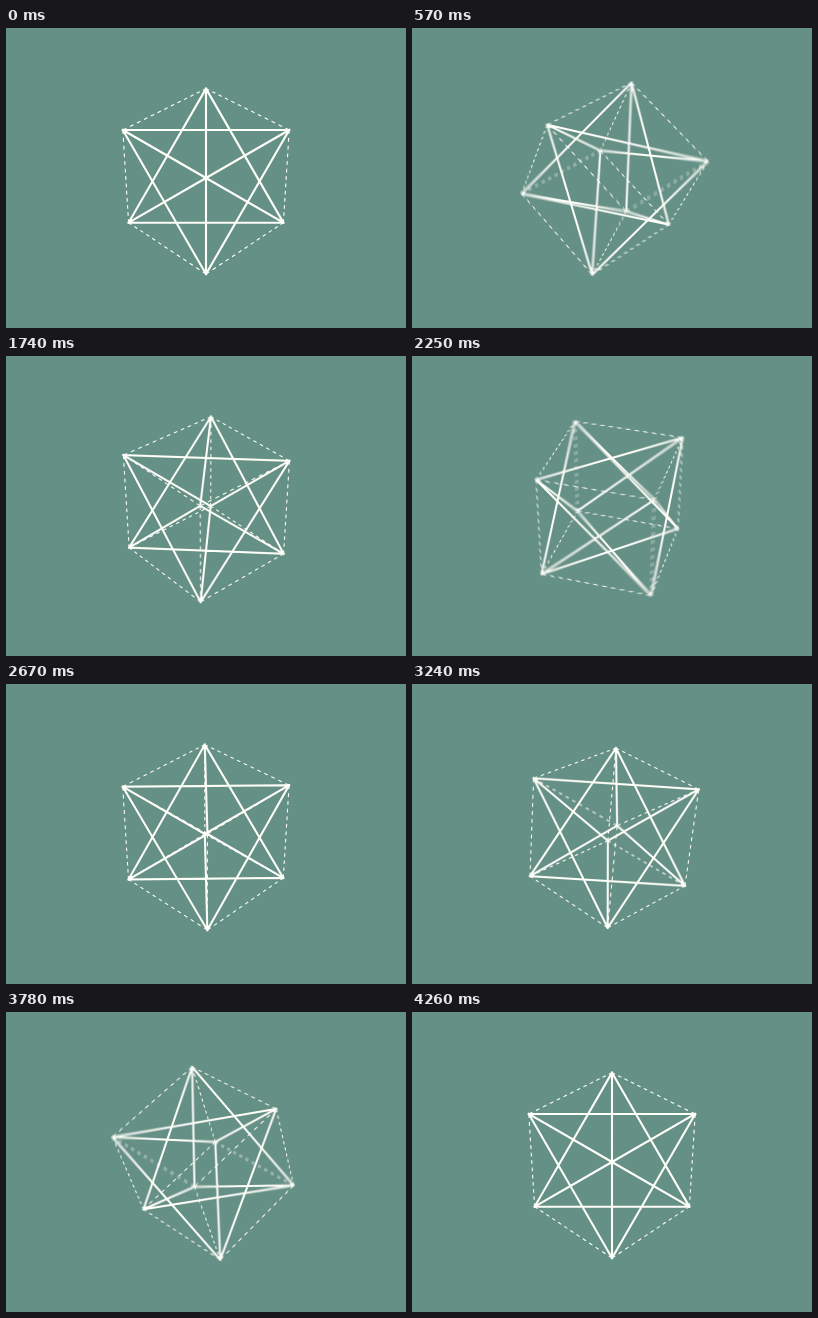
Recreate the animation shown at these times as an HTML page with a canvas. Size 400 by 300 pixels, loop 4320 ms.

```html
<!DOCTYPE html>
<html lang="en">
<head>
<meta charset="utf-8">
<title>Turning cube</title>
<style>
  html, body { margin: 0; width: 100%; height: 100%; overflow: hidden; background: #659085; }
  canvas { display: block; width: 400px; height: 300px; }
</style>
</head>
<body>
<canvas id="stage" width="400" height="300"></canvas>
<script>
const W = 400, H = 300;
const BG = '#659085', INK = '#fffffa';
const HALF = 56.7, CAMERA = 905;       // half edge of the cube, viewer distance
const STEP = 30, TURN = 1440, LOOP = 3 * TURN;
const SHUTTER = 25, SAMPLES = 14;      // motion blur
const PARTS = 25;                      // dashes and gaps per edge

const ctx = document.getElementById('stage').getContext('2d');
const layer = document.createElement('canvas');
layer.width = W;
layer.height = H;
const pen = layer.getContext('2d');

// Cube axes seen along a space diagonal: x right, y down, z to the viewer.
const r2 = Math.SQRT1_2, r6 = 1 / Math.sqrt(6), r3 = 1 / Math.sqrt(3);
const AXES = [[r2, r6, r3], [-r2, r6, r3], [0, -2 * r6, r3]];
const ORDER = [1, 2, 0];               // axis of each quarter turn

const edges = [], diagonals = [];
for (let i = 0; i < 8; i++) {
  for (let j = i + 1; j < 8; j++) {
    const bits = [1, 2, 4].filter(b => (i ^ j) & b).length;
    if (bits === 1) edges.push([i, j]);
    if (bits === 2) diagonals.push([i, j]);
  }
}

const ease = t => t < 0.5 ? 4 * t ** 3 : 1 - 4 * (1 - t) ** 3;
const mix = (a, b, k) => a.map((v, i) => v + (b[i] - v) * k);

function turnedAxes(time) {
  const t = ((time % LOOP) + LOOP) % LOOP;
  const n = Math.floor(t / TURN);
  const angle = ease(t / TURN - n) * Math.PI / 2;
  const c = Math.cos(angle), s = Math.sin(angle);
  const k = ORDER[n], p = (k + 1) % 3, q = (k + 2) % 3;
  const axes = [];
  axes[k] = AXES[k];
  axes[p] = AXES[p].map((v, i) => c * v + s * AXES[q][i]);
  axes[q] = AXES[q].map((v, i) => c * v - s * AXES[p][i]);
  return axes;
}

function project([x, y, z]) {
  const k = CAMERA / (CAMERA - z);
  return [W / 2 + x * k, H / 2 + y * k];
}

function segment(a, b) {
  pen.moveTo(...project(a));
  pen.lineTo(...project(b));
}

function drawCube(time) {
  const axes = turnedAxes(time);
  const points = Array.from({ length: 8 }, (_, i) =>
    [0, 1, 2].map(d => HALF * axes.reduce(
      (sum, axis, n) => sum + (i >> n & 1 ? axis[d] : -axis[d]), 0)));

  pen.fillStyle = BG;
  pen.fillRect(0, 0, W, H);
  pen.strokeStyle = INK;

  pen.lineWidth = 1.1;
  pen.lineCap = 'butt';
  pen.beginPath();
  for (const [i, j] of edges) {
    for (let d = 0; d < PARTS; d += 2) {
      segment(mix(points[i], points[j], d / PARTS),
              mix(points[i], points[j], (d + 1) / PARTS));
    }
  }
  pen.stroke();

  pen.lineWidth = 2.1;
  pen.lineCap = 'square';
  pen.beginPath();
  for (const [i, j] of diagonals) segment(points[i], points[j]);
  pen.stroke();
}

function render(time) {
  const start = Math.floor(time / STEP) * STEP;
  for (let n = 0; n < SAMPLES; n++) {
    drawCube(start + SHUTTER * (n + 0.5) / SAMPLES);
    ctx.globalAlpha = 1 / (n + 1);     // running average
    ctx.drawImage(layer, 0, 0);
  }
}

const origin = performance.now();
function tick() {
  render((performance.now() - origin) % LOOP);
  requestAnimationFrame(tick);
}
tick();
</script>
</body>
</html>
```
